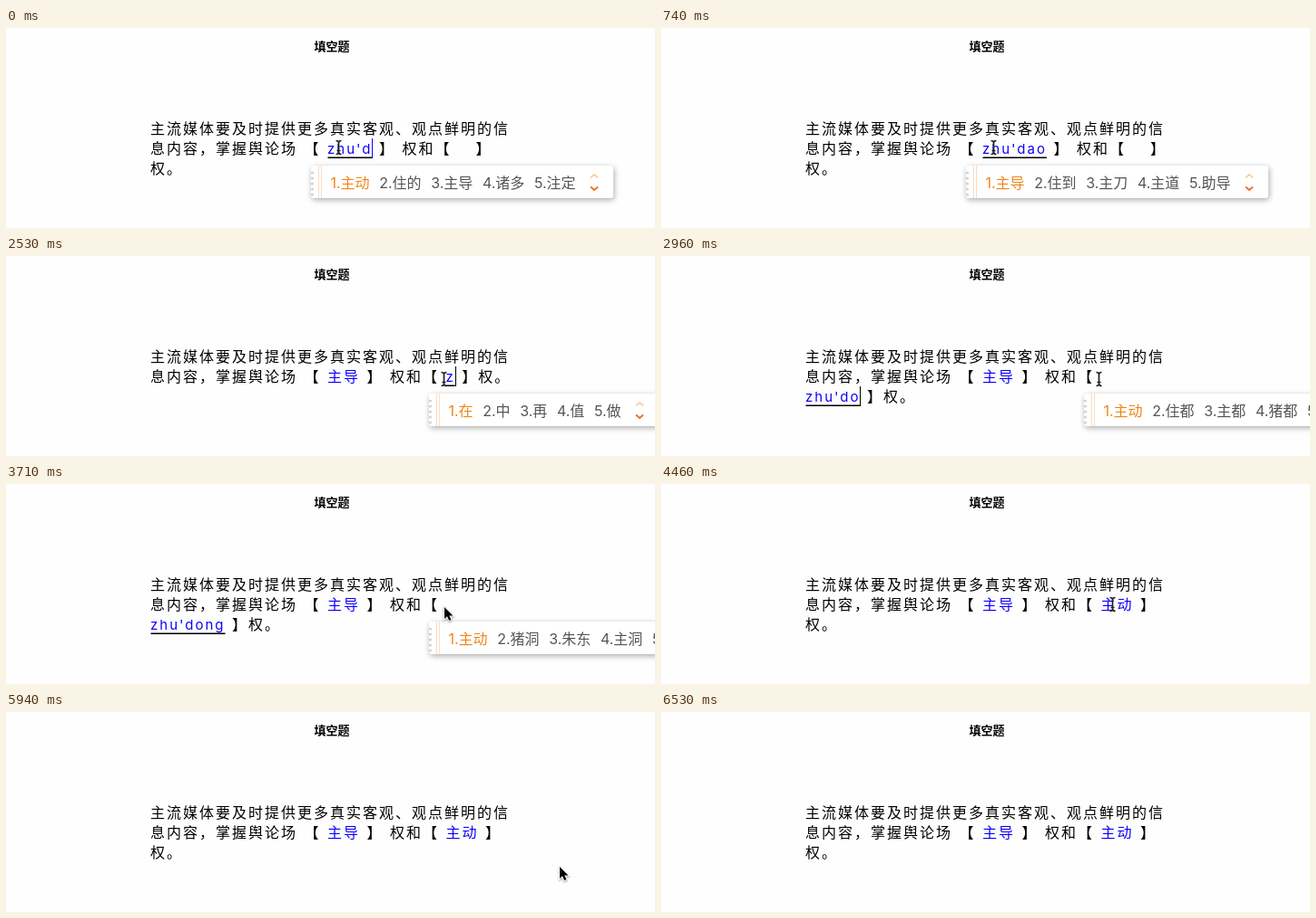
Write an HTML page with a canvas that moves like this. It is 715 by 221 pixels and loops after 6.75 s.

```html
<!DOCTYPE html>
<html lang="zh-CN">
<head>
<meta charset="utf-8">
<title>填空题</title>
<style>
html, body { margin: 0; width: 100%; height: 100%; overflow: hidden; background: #fefefe; }
canvas { display: block; }
</style>
</head>
<body>
<canvas id="stage" width="715" height="221"></canvas>
<script>
const ctx = document.getElementById('stage').getContext('2d');
const LOOP = 6750, TICK = 148.4;
const HAN = '"Noto Sans CJK SC", "Noto Sans CJK", sans-serif';
const MIXED = 'Inter, ' + HAN;
const LEFT = 159, RIGHT = 560, LINE = 22, GAP = 7.5, ITEM_GAP = 10.6;
const BLUE = '#1000ff', ORANGE = '#f08519', PALE = '#fbc08c';

// time, first blank, second blank, input candidates
const typing = [
  [0, "zhu'd", '', '主动 住的 主导 诸多 注定'],
  [150, "zhu'da", '', '主打 住大 主大 逐打 助打'],
  [300, "zhu'dao", '', '主导 住到 主刀 主道 助导'],
  [890, '主导', '', ''],
  [2530, '主导', 'z', '在 中 再 值 做'],
  [2670, '主导', 'zhu', '主 住 祝 猪 注'],
  [2820, '主导', "zhu'd", '主动 住的 主导 诸多 注定'],
  [2960, '主导', "zhu'do", '主动 住都 主都 猪都 注都'],
  [3260, '主导', "zhu'dong", '主动 猪洞 朱东 主洞 驻东'],
  [3860, '主导', '主动', '']
];
const caretToggles = [0, 740, 890, 1340, 1780, 2380, 2530, 3710, 3860, 4460, 4900, 5340];
const SECOND_FOCUS = 1930;

const pointerPath = [
  [0, 367, 132], [890, 367, 132], [1630, 483, 136], [4310, 483, 136],
  [4610, 515, 130], [4900, 570, 130], [5050, 581, 135], [5340, 590, 158],
  [5790, 590, 158], [6380, 672, 211], [6530, 690, 226], [LOOP, 690, 226]
];

function setFont(font, spacing) {
  ctx.font = font;
  ctx.letterSpacing = spacing + 'px';
}

function text(str, x, y, { font = '16px ' + HAN, color = '#000', spacing = 0 } = {}) {
  setFont(font, spacing);
  ctx.fillStyle = color;
  ctx.fillText(str, x, y);
  return ctx.measureText(str).width;
}

function stroke(points, color, width) {
  ctx.beginPath();
  points.forEach(([x, y]) => ctx.lineTo(x, y));
  ctx.strokeStyle = color;
  ctx.lineWidth = width;
  ctx.stroke();
}

const isPinyin = str => /^[a-z]/.test(str);
const blankFont = str => isPinyin(str) ? '15px ' + MIXED : '16px ' + HAN;

function blankWidth(str) {
  if (!str) return 12;
  setFont(blankFont(str), 2);
  return ctx.measureText(str).width;
}

function drawSentence(first, second, caretField) {
  let x = LEFT, y = 117;
  const put = str => { x += text(str, x, y, { spacing: 2 }); };
  const newLine = () => { x = LEFT; y += LINE; };
  const blank = (str, hasCaret, caretColor) => {
    const width = blankWidth(str);
    text(str, x, y, { font: blankFont(str), color: BLUE, spacing: 2 });
    ctx.fillStyle = '#000';
    if (isPinyin(str)) ctx.fillRect(x + 0.5, y + 3.5, width - 0.5, 1.5);
    ctx.fillStyle = caretColor;
    if (hasCaret) ctx.fillRect(Math.round(x + width - (str ? 0 : 2)), y - 17, 1, LINE);
    x += width + GAP;
  };

  put('主流媒体要及时提供更多真实客观、观点鲜明的信');
  newLine();
  put('息内容，掌握舆论场');
  x += GAP;
  put('【');
  x += GAP;
  blank(first, caretField === 1, BLUE);
  put('】');
  x += GAP;
  put('权和【');
  x += GAP;
  if (x + blankWidth(second) + GAP + 18 > RIGHT) newLine();
  blank(second, caretField === 2, '#000');
  put('】');
  if (x + 36 > RIGHT) newLine();
  put('权。');
}

function drawPanel(left, words) {
  const font = '16px ' + MIXED;
  const items = words.split(' ').map((word, i) => `${i + 1}.${word}`);
  setFont(font, 0);
  const textWidth = items.reduce((sum, item) => sum + ctx.measureText(item).width + ITEM_GAP, -ITEM_GAP);
  const arrowX = left + 23 + textWidth + 20;

  ctx.save();
  ctx.shadowColor = 'rgba(0,0,0,.33)';
  ctx.shadowBlur = 6;
  ctx.shadowOffsetX = 1;
  ctx.shadowOffsetY = 2;
  ctx.fillStyle = '#fff';
  ctx.beginPath();
  ctx.roundRect(left + 1, 152, arrowX + 20 - left, 36, 3);
  ctx.fill();
  ctx.restore();

  ctx.fillStyle = '#d2d2d2';
  for (let y = 160; y < 185; y += 6) {
    ctx.beginPath();
    ctx.arc(left + 2.5, y, 1.6, 0, 7);
    ctx.fill();
  }
  for (const dx of [9.5, 12.5]) stroke([[left + dx, 152], [left + dx, 188]], '#fbdcc0', 1);

  let x = left + 22.5;
  items.forEach((item, i) => {
    x += text(item, x, 176.5, { font, color: i ? '#555' : ORANGE }) + ITEM_GAP;
  });
  stroke([[arrowX - 4, 165.5], [arrowX, 162], [arrowX + 4, 165.5]], PALE, 1.5);
  stroke([[arrowX - 4, 175.5], [arrowX, 179], [arrowX + 4, 175.5]], '#f26a1b', 1.7);
}

function drawPointer(x, y, arrow) {
  ctx.save();
  ctx.translate(x, y);
  if (arrow) {
    const shape = new Path2D('M0 0V13L3 10.2L5.2 15L7.5 14L5.3 9.4H9.5Z');
    ctx.shadowColor = 'rgba(0,0,0,.4)';
    ctx.shadowBlur = 2;
    ctx.shadowOffsetY = 1;
    ctx.strokeStyle = '#fff';
    ctx.lineWidth = 2;
    ctx.stroke(shape);
    ctx.shadowColor = 'transparent';
    ctx.fillStyle = '#000';
    ctx.fill(shape);
  } else {
    const beam = new Path2D('M-3 -7.5Q0 -7.5 0 -5Q0 -7.5 3 -7.5M0 -5.5V5.5M-3 7.5Q0 7.5 0 5Q0 7.5 3 7.5M-2 3.5H2');
    ctx.translate(-0.5, 0);
    ctx.strokeStyle = '#222';
    ctx.stroke(beam);
  }
  ctx.restore();
}

function pointerAt(t) {
  const i = pointerPath.findIndex(key => key[0] > t);
  const [t0, x0, y0] = pointerPath[i - 1], [t1, x1, y1] = pointerPath[i];
  const k = (t - t0) / (t1 - t0);
  return [x0 + (x1 - x0) * k, y0 + (y1 - y0) * k];
}

function draw(t) {
  const [, first, second, words] = typing.findLast(state => state[0] <= t);
  const field = t < SECOND_FOCUS ? 1 : 2;
  const caretOn = caretToggles.filter(time => time <= t).length % 2;

  ctx.fillStyle = '#fefefe';
  ctx.fillRect(0, 0, 715, 221);
  text('填空题', 339.5, 25, { font: 'bold 13px ' + HAN });
  drawSentence(first, second, caretOn ? field : 0);
  if (words) drawPanel(field === 1 ? 335 : 465, words);

  const tick = Math.floor((t + 5) / TICK) * TICK;
  const arrow = (t >= 3260 && t < 4460) || t >= 4750;
  drawPointer(...pointerAt(tick).map(Math.round), arrow);
}

const start = performance.now();
function frame() {
  draw((performance.now() - start) % LOOP);
  requestAnimationFrame(frame);
}
frame();
</script>
</body>
</html>
```
